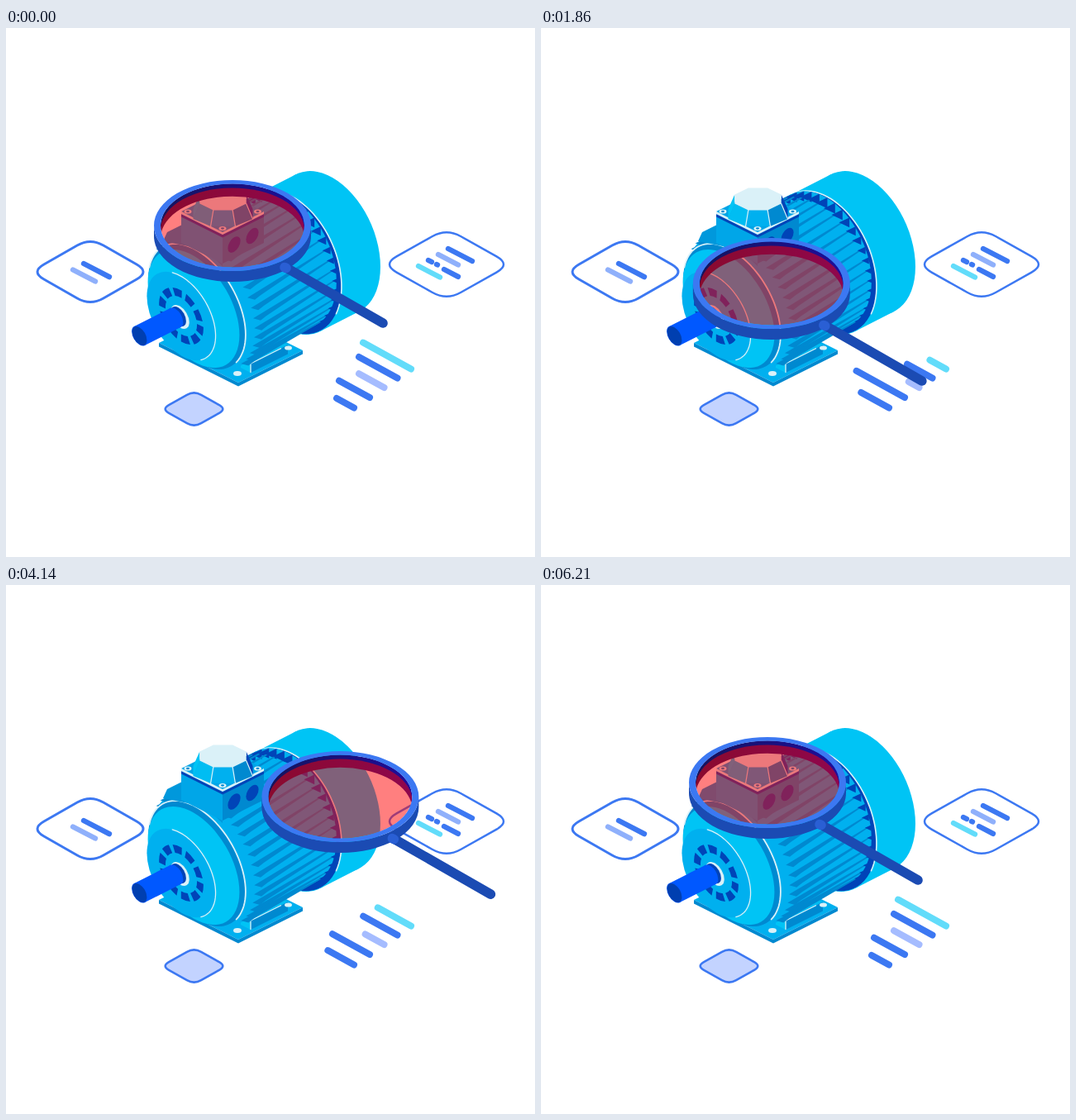
Write an HTML page that moves like this. It is 640x640 px and loops after 7.21 s.

```html
<!DOCTYPE html>
<html lang="en">
<head>
<meta charset="utf-8">
<title>Motor inspection</title>
<style>
html, body { margin: 0; width: 100%; height: 100%; overflow: hidden; background: #fff; }
svg { display: block; width: 100%; height: 100%; }
</style>
</head>
<body>
<svg id="stage" viewBox="0 0 640 640"></svg>
<script>
const LOOP = 7210, FPS = 14, END = 6210, TILT = .5;
const BLUE = '#3c78f2', CYAN = '#00c4f5', SKY = '#00b0ef', MID = '#0089d0';
const DEEP = '#0044b8', PALE = '#daf1f8', AQUA = '#62dcfa', LILAC = '#a5bcff', STEEL = '#1b4bb3';

// Width and skew of circles seen at the two ends of the motor
const FRONT = [.866, .5], BACK = [.78, .35];

const path = (d, attrs) => `<path d="${d}" ${attrs}/>`;
const poly = (pts, fill) => `<polygon points="${pts}" fill="${fill}"/>`;
const oval = (x, y, r, fill) => `<ellipse cx="${x}" cy="${y}" rx="${r}" ry="${r * .58}" fill="${fill}"/>`;
const range = (from, to, step) =>
  Array.from({ length: Math.floor((to - from) / step) + 1 }, (_, i) => from + i * step);
const line = (x1, y1, x2, y2, color, w) =>
  `<line x1="${x1}" y1="${y1}" x2="${x2}" y2="${y2}" stroke="${color}" stroke-width="${w}" stroke-linecap="round"/>`;
// Sloping bar given by its left end and width
const bar = (x, y, w, color) => line(x, y, x + w, y + w * .52, color, 6.3);

const disc = (x, y, r, attrs, [w, k] = FRONT) =>
  `<circle r="${r}" transform="matrix(${w} ${k} 0 1 ${x} ${y})" ${attrs}/>`;
const fill = color => `fill="${color}"`;

function onDisc(x, y, r, angle, [w, k] = FRONT) {
  const c = Math.cos(angle), s = Math.sin(angle);
  return [x + r * w * c, y + r * (k * c + s)];
}

// Solid between two end circles [x, y, radius, shape]
function drum(a, b, color) {
  const edge = ([x, y, r, shape = FRONT], turn) =>
    onDisc(x, y, r, Math.atan2(1, shape[1] + TILT * shape[0]) + turn, shape);
  const end = ([x, y, r, shape]) => disc(x, y, r, fill(color), shape);
  return end(b) + end(a) + poly([edge(a, 0), edge(b, 0), edge(b, Math.PI), edge(a, Math.PI)], color);
}

function rim(x, y, r, from, to, w, shape) {
  const pts = range(from, to, 4).map(a => onDisc(x, y, r, a * Math.PI / 180, shape));
  return path('M' + pts.join('L'), `fill="none" stroke="${PALE}" stroke-width="${w}" stroke-linecap="round"`);
}

// Box from its nearest top corner: lengths to the left and right, depth down
function prism(x, y, l, r, depth, top, left, right) {
  const L = [x - l, y - l * TILT], R = [x + r, y - r * TILT], P = [x, y];
  const down = ([a, b]) => [a, b + depth];
  return poly([P, L, [x - l + r, y - (l + r) * TILT], R], top) +
    poly([P, L, down(L), down(P)], left) + poly([P, R, down(R), down(P)], right);
}

function card(x, y, rx, ry, color, w) {
  const k = .22, W = rx / (1 - k / 2), H = ry / (1 - k / 2);
  const corner = (a, b) => [x + a * W, y + b * H];
  const d = [[0, -1], [1, 0], [0, 1], [-1, 0]].map(([a, b], i) => {
    const from = corner(a * (1 - k) + b * k, b * (1 - k) - a * k);
    const to = corner(a * (1 - k) - b * k, b * (1 - k) + a * k);
    return `${i ? 'L' : 'M'}${from}Q${corner(a, b)} ${to}`;
  }).join('');
  return path(d + 'Z', `fill="${color}" stroke="${BLUE}" stroke-width="${w}"`);
}

function cards() {
  return card(102, 295, 64, 36.5, '#fff', 3) +
    bar(94, 285, 31, BLUE) + bar(81, 292.5, 27, '#8fb0fb') +
    card(533, 286, 69, 38.8, '#fff', 2.5) +
    bar(535, 267, 29, BLUE) + bar(523, 274, 24, '#8fb0fb') +
    bar(511, 281, 4, BLUE) + bar(521, 286, 1, BLUE) +
    bar(499, 288, 26, AQUA) + bar(530, 292, 17, BLUE) +
    card(227.5, 461, 34.8, 19.6, '#c3d3ff', 2.6);
}

function body() {
  const a = [240, 332, 72, FRONT], b = [339, 280, 78, BACK];
  const at = ([x, y, r, shape], angle) => onDisc(x, y, r, angle, shape);
  const ribs = range(-2.25, .8, .157).map(t => {
    const [x, y] = at(a, t), [u, v] = at(b, t), size = 5 + 8 * Math.max(0, -Math.sin(t));
    return poly([x - 2, y - 1, u, v, u, v + 1.6, x + 14, y - 4, x + 7, y + 1.5], MID) +
      poly([u + 1, v, u - size, v + size / 2, u + 1, v + size], DEEP);
  });
  const teeth = range(-3.14, -2.3, .157).map(t => {
    const [x, y] = at(a, t);
    return poly([x - 3, y, x + 12, y - 7, x + 10, y + 4], MID);
  });
  return drum(a, b, SKY) + ribs.join('') + teeth.join('');
}

function feet() {
  return prism(281, 429, 96, 78, 4.5, SKY, MID, MID) +
    prism(296, 406, 12, 45, 11, '#00bdf2', CYAN, MID) +
    path('M284 400L296 406V417M296 406L333 387.500', `fill="none" stroke="${PALE}" stroke-width="1.3"`) +
    oval(280, 418, 5, PALE) + oval(341.5, 387, 4.5, PALE);
}

function cap() {
  const corner = (y, rx, ry, i) => {
    const a = (i + .5) * Math.PI / 4;
    return [262.5 + rx * Math.cos(a), y + ry * Math.sin(a)];
  };
  const top = i => corner(207, 30.5, 14.5, i), base = i => corner(225, 39, 16, i);
  const sides = [DEEP, MID, SKY, '#00bdf2', CYAN].map((color, n) =>
    poly([top(n - 1), top(n), base(n), base(n - 1)], color));
  const edges = [1, 2, 3].map(n => line(...top(n - 1), ...base(n - 1), PALE, 1.2));
  return sides.join('') + edges.join('') + poly(range(0, 7, 1).map(top), PALE);
}

function terminalBox() {
  const hole = (x, y) => `<circle r="8.8" transform="matrix(.866 -.5 0 1 ${x} ${y})" fill="${DEEP}"/>`;
  const bolt = (x, y) => oval(x, y, 4.5, PALE) + oval(x, y, 2, MID);
  return poly([195, 247, 213, 238, 262, 262, 262, 288, 240, 268, 190, 258], '#0098dc') +
    prism(262, 252, 50, 50, 33, SKY, '#00a6e8', MID) +
    hole(276, 262) + hole(298, 251.5) +
    prism(262, 250, 50, 50, 3.5, SKY, DEEP, DEEP) +
    prism(262, 247, 50, 50, 3, '#00a4e6', PALE, PALE) +
    bolt(220, 222) + bolt(262, 242.5) + bolt(304.5, 222) + cap();
}

function face() {
  const slots = `fill="none" stroke="${DEEP}" stroke-width="9" stroke-dasharray="11.3 5.35" stroke-dashoffset="3"`;
  return disc(231, 337, 68, fill(MID)) +
    disc(227, 339.5, 64, fill(CYAN)) +
    rim(231, 337, 68, -168, 36, 1.8) +
    disc(212, 348.5, 48, fill(SKY)) +
    rim(212, 348.5, 48, -105, 55, 1.3) +
    disc(212, 348.5, 26.5, slots) +
    disc(210.5, 349.5, 13, fill(PALE)) + disc(208.5, 349, 10.8, fill(DEEP)) +
    drum([161.5, 372.5, 10.8], [205, 350.5, 10.8], '#0058ff') +
    disc(161.5, 372.5, 10.3, fill('#003fb0'));
}

function motor() {
  return drum([342, 284, 82, BACK], [389, 260, 82, BACK], CYAN) +
    disc(342, 284, 81.5, fill(DEEP), BACK) +
    rim(342, 284, 82, -130, 28, 1.6, BACK) +
    feet() + body() + face() + terminalBox();
}

function lens() {
  const outer = 'A95 55 0 0 ', inner = 'A87 50.5 0 ';
  const side = `M-95 0V13${outer}0 95 13V0${outer}1-95 0Z`;
  const ring = `M-95 0${outer}1 95 0${outer}1-95 0ZM-87 0${inner}0 1 87 0${inner}0 1-87 0Z`;
  const wall = `M-86 7.5${inner}1 1 86 7.5${inner}0 0-86 7.5Z`;
  const glass = `M-86.9 2.5${inner}0 1 86.9 2.5${inner}0 1-86.9 2.5Z`;
  return path(wall, 'fill="url(#wall)"').replace('/>', '/>') +
    path(glass, 'fill="#f00" fill-opacity=".5"') +
    path(side, fill(STEEL)) +
    path(ring, `fill="${BLUE}" fill-rule="evenodd"`) +
    line(65, 51, 182, 118, STEEL, 11.6) + line(63, 50.5, 65, 51.5, '#2a5fd4', 11.6);
}

// Smooth curve through key points [time, x, y], at rest at both ends
const keys = [
  [0, 0, 0], [790, -11, 38], [1860, 5, 70], [3210, 131, 37],
  [3930, 144, 21], [4710, 72.5, 8.5], [5500, 2, 1], [END, 0, 0]
];
function lensAt(t) {
  if (t >= END) return [0, 0];
  const i = keys.findIndex(key => key[0] > t) - 1;
  const a = keys[i], b = keys[i + 1], h = b[0] - a[0], s = (t - a[0]) / h;
  const slope = (n, k) => keys[n - 1] && keys[n + 1]
    ? (keys[n + 1][k] - keys[n - 1][k]) / (keys[n + 1][0] - keys[n - 1][0]) * h : 0;
  return [1, 2].map(k => {
    const m = slope(i, k), n = slope(i + 1, k), d = b[k] - a[k];
    return a[k] + s * (m + s * (3 * d - 2 * m - n + s * (m + n - 2 * d)));
  });
}

// Each bar changes its width once and returns, turning at its peak time
const bars = [
  { x: 490, y: 412.5, w: 58, change: -42, peak: 2450, color: AQUA },
  { x: 473.5, y: 423.5, w: 46.5, change: -16, peak: 1900, color: BLUE },
  { x: 457.5, y: 435, w: 30.5, change: -19, peak: 2350, color: LILAC },
  { x: 440, y: 447, w: 37, change: 22, peak: 2150, color: BLUE },
  { x: 421, y: 459.5, w: 21, change: 17, peak: 3200, color: BLUE }
];
function pulse(t, peak) {
  if (t >= END) return 0;
  const u = Math.pow(t < peak ? t / peak : (t - peak) / (END - peak), .75);
  const wave = (1 - Math.cos(Math.PI * u)) / 2;
  return t < peak ? wave : 1 - wave;
}

const stage = document.getElementById('stage');
stage.innerHTML = `<defs><linearGradient id="wall"><stop stop-color="#14145c"/><stop offset="1" stop-color="#1f0d9c"/></linearGradient></defs>
  ${cards()}${motor()}
  <g id="bars">${bars.map(b => line(b.x, b.y, b.x, b.y, b.color, 8)).join('')}</g>
  <g id="lens">${lens()}</g>`;
const lensEl = document.getElementById('lens');
const barEls = [...document.getElementById('bars').children];

function draw(ms) {
  const t = Math.floor((ms % LOOP + 5) * FPS / 1000) * 1000 / FPS;
  const [x, y] = lensAt(t);
  lensEl.setAttribute('transform', `translate(${274 + x} ${239 + y})`);
  bars.forEach((b, i) => {
    const w = b.w + b.change * pulse(t, b.peak);
    barEls[i].setAttribute('x1', b.x - w);
    barEls[i].setAttribute('y1', b.y - w * .55);
  });
}

const start = performance.now();
function tick() {
  draw(performance.now() - start);
  requestAnimationFrame(tick);
}
tick();
</script>
</body>
</html>
```
